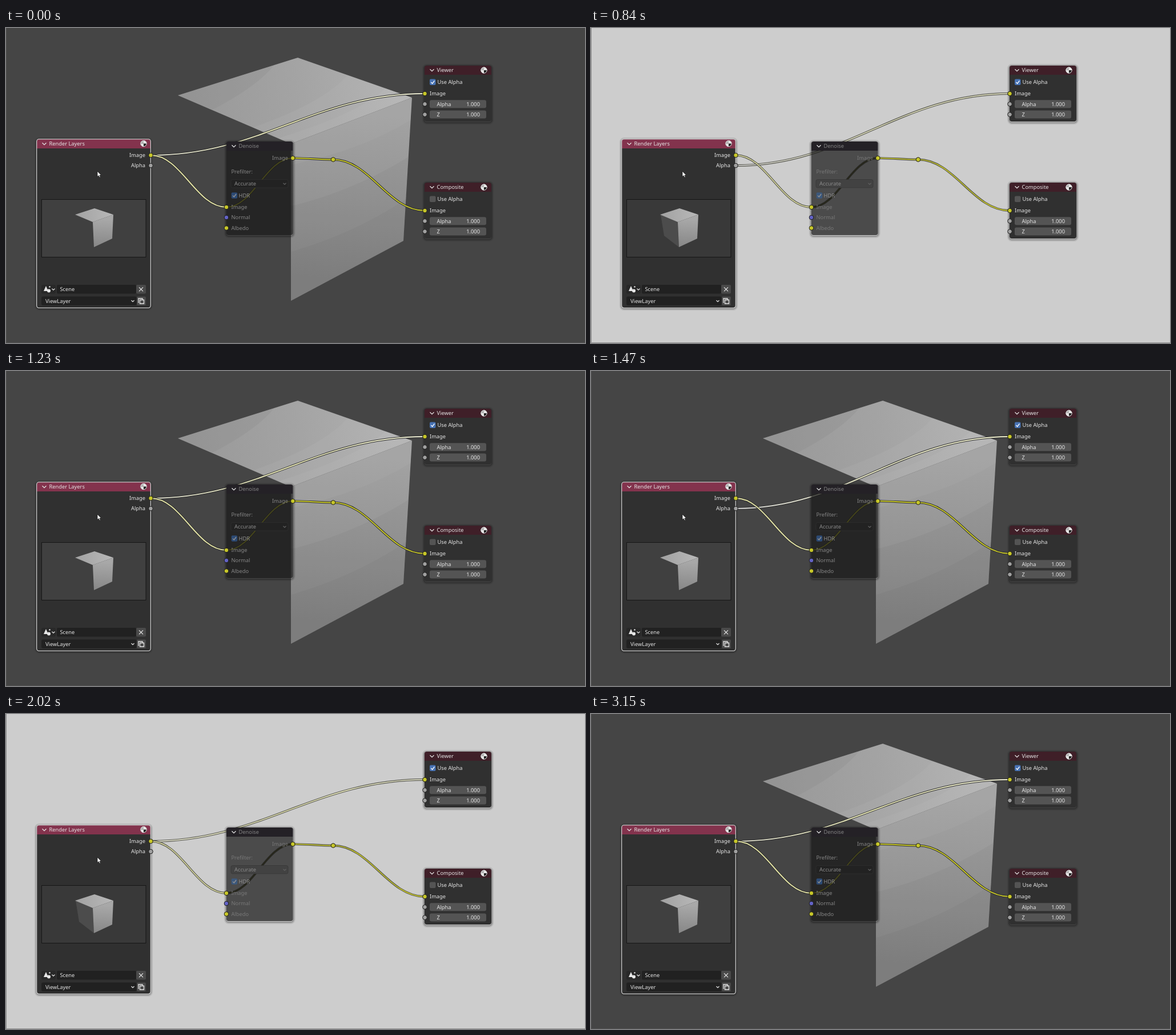
Recreate the animation shown at these times as an HTML page. Size 1014 by 552 pixels, loop 3.33 s.

```html
<!DOCTYPE html>
<html lang="en">
<head>
<meta charset="utf-8">
<title>Compositor nodes</title>
<style>
html, body { margin: 0; height: 100%; overflow: hidden; background: #454545; }
svg {
  display: block; width: 1014px; height: 552px;
  font: 9.3px "Noto Sans", "Open Sans", sans-serif;
  --bg: #454545; --edge: #525252; --rim: #e4e4e4; --muted: #868686; --field: #222;
  --check: #2c4a74; --inner: #b5b522; --thumb: #404040; --core: 2; --line: #2a2a2a;
}
svg.light {
  --bg: #cdcdcd; --edge: #8c8c8c; --rim: #d8d8d8; --muted: #787878; --field: #424242;
  --check: #3c587c; --inner: #4a4a18; --thumb: #393939; --core: 1.6; --line: #55554c;
}
.backdrop, .alpha .from-image, .from-alpha { display: none; }
svg:not(.light) .backdrop, .alpha .from-alpha { display: inline; }
.light .dark-only, svg:not(.light) .light-only { display: none; }
</style>
</head>
<body>
<script>
const WHITE = '#e6e6e6', YELLOW = '#c7c729', GREY = '#a1a1a1', PURPLE = '#6363c7';

const rect = (x, y, w, h, fill, r = 0, extra = '') =>
  `<rect x="${x}" y="${y}" width="${w}" height="${h}" rx="${r}" style="fill:${fill}" ${extra}/>`;
const poly = (points, fill, extra = '') => `<polygon points="${points}" fill="${fill}" ${extra}/>`;
const stroke = (d, color, width, extra = '') =>
  `<path d="${d}" fill="none" style="stroke:${color};stroke-width:${width}" ${extra}/>`;
const text = (x, y, label, fill = WHITE, anchor = 'start') =>
  `<text x="${x}" y="${y + 3.4}" style="fill:${fill}" text-anchor="${anchor}">${label}</text>`;
const chevron = (x, y, s = 3.5, color = WHITE) =>
  stroke(`M${x - s} ${y - s / 2}l${s} ${s}l${s} ${-s}`, color, 1.2);
const socket = (x, y, color) =>
  `<circle cx="${x}" cy="${y}" r="3.8" fill="${color}" stroke="#1c1c1c"/>`;
const gradient = (id, x1, y1, x2, y2, ...colors) =>
  `<linearGradient id="${id}" gradientUnits="userSpaceOnUse" x1="${x1}" y1="${y1}" x2="${x2}" y2="${y2}">` +
  colors.map((c, i) => `<stop offset="${i / (colors.length - 1)}" stop-color="${c}"/>`).join('') +
  '</linearGradient>';

// Noodle between two sockets with horizontal handles
function link(x1, y1, x2, y2, color) {
  const d = (x2 - x1) * 0.4;
  const path = `M${x1} ${y1}C${x1 + d} ${y1} ${x2 - d} ${y2} ${x2} ${y2}`;
  return stroke(path, 'var(--line)', 3.8) + stroke(path, color, 'var(--core)');
}

function checkbox(x, y, fill, tick) {
  return rect(x, y, 10.5, 10.5, fill, 2) +
    (tick ? stroke(`M${x + 2.4} ${y + 5.4}l2.2 2.4l3.8 -5`, tick, 1.4) : '');
}

const sphere = (x, y) =>
  `<circle cx="${x}" cy="${y}" r="5.2" fill="#222" stroke="${WHITE}"/>` +
  `<path d="M${x} ${y}v-5.2a5.2 5.2 0 0 1 5.2 5.2zM${x} ${y}v5.2a5.2 5.2 0 0 1 -5.2 -5.2z" fill="${WHITE}"/>` +
  `<path d="M${x} ${y}v-5.2a5.2 5.2 0 0 0 -5.2 5.2z" fill="${WHITE}" opacity=".75"/>`;

function node(x, y, w, h, title, header, body, bodyOpacity = 1, color = WHITE) {
  const halo = (out, opacity) => rect(x - out, y - out + 1, w + 2 * out, h + 2 * out, 'none', 4 + out,
    `stroke="#000" stroke-width="${2 * out}" opacity="${opacity}"`);
  const hh = 16, b = y + h, r = x + w;
  return halo(1, 0.22) + halo(2, 0.1) +
    `<path d="M${x} ${y + hh}H${r}V${b - 4}q0 4 -4 4H${x + 4}q-4 0 -4 -4z" fill="${body}" opacity="${bodyOpacity}"/>` +
    `<path d="M${x} ${y + hh}V${y + 4}q0 -4 4 -4H${r - 4}q4 0 4 4V${y + hh}z" fill="${header}"/>` +
    chevron(x + 13, y + 8) + text(x + 21.5, y + 8, title, color);
}

function outputNode(y, title, useAlpha) {
  const field = (dy, label) => rect(742, y + dy - 7, 99, 14, '#545454', 3) +
    text(754.5, y + dy, label) + text(830, y + dy, '1.000', WHITE, 'end') + socket(733.5, y + dy, GREY);
  return node(733, y, 117, 98, title, '#3f1f28', '#303030') + sphere(837, y + 8) +
    checkbox(742, y + 23.5, useAlpha ? '#4772b3' : '#545454', useAlpha && '#fff') +
    text(755.5, y + 28.5, 'Use Alpha') +
    text(742, y + 49, 'Image') + socket(733.5, y + 49, YELLOW) +
    field(67.3, 'Alpha') + field(85.6, 'Z');
}

function renderLayers() {
  return node(54, 195, 199, 295, 'Render Layers', '#83334d', '#303030') + sphere(241, 202.5) +
    rect(53.7, 194.7, 199.6, 295.8, 'none', 4, 'stroke="var(--rim)" stroke-width="1.1"') +
    text(244, 223, 'Image', WHITE, 'end') + text(244, 241, 'Alpha', WHITE, 'end') +
    rect(62.5, 300.5, 182.5, 101, 'var(--thumb)', 0, 'stroke="#161616"') +
    poly('122,327 152,339 154,384 128,364', '#4c4c4c', 'class="light-only"') +
    poly('121,327 155,316 188,327 152,340', 'url(#thumbTop)') +
    poly('152,340 188,327 186,369 154,384', 'url(#thumbSide)') +
    rect(62, 450, 25, 15.5, '#282828', 3) + rect(89, 450, 139, 15.5, '#212121', 2) +
    rect(228, 450, 17, 15.5, '#4a4a4a', 2) +
    `<path d="M70 452l4 9h-8z" fill="${WHITE}"/><circle cx="75" cy="460.5" r="3" fill="${WHITE}"/>` +
    `<circle cx="76.5" cy="453.5" r="1.2" fill="${WHITE}"/>` +
    chevron(83, 458, 2.5) + text(94.5, 457.7, 'Scene') +
    stroke('M233 454.3l7 7m0 -7l-7 7', WHITE, 1.2) +
    rect(62, 470.5, 167, 15.5, '#212121', 3) + rect(229, 470.5, 16, 15.5, '#4a4a4a', 2) +
    text(69, 478.3, 'ViewLayer') + chevron(222, 478.5, 2.5) +
    stroke('M232 482v-8h7v2M234.5 476.500h7v6.500h-7zM232 474h7', WHITE, 1.3) +
    socket(253.5, 223, YELLOW) + socket(253.5, 241, GREY);
}

function denoise() {
  const dim = 'var(--muted)';
  const input = (y, label, color) => text(394.5, y, label, dim) + socket(386, y, color);
  return node(386, 199, 116.5, 164, 'Denoise', '#242126', '#1a1a1a', 0.72, '#858585') +
    text(494, 228, 'Image', dim, 'end') + socket(502.3, 228, YELLOW) +
    text(394.5, 252, 'Prefilter:', dim) +
    rect(394, 265.5, 100, 14.5, 'var(--field)', 3, 'stroke="#333" stroke-width=".6"') +
    text(400, 272.7, 'Accurate', '#8c8c8c') + chevron(488, 273, 2.5, '#606060') +
    checkbox(394.7, 288.2, 'var(--check)', '#929292') + text(407.5, 293.5, 'HDR', '#929292') +
    input(314, 'Image', YELLOW) + input(332, 'Normal', PURPLE) + input(350.5, 'Albedo', YELLOW);
}

function backdrop() {
  const top = '301,118 511,52 711,122 499,203', side = '499,203 711,122 696,373 499,478';
  const band = (d, color, opacity) => `<path d="${d}" fill="${color}" opacity="${opacity}"/>`;
  return `<g class="backdrop">${poly(top, 'url(#top)')}${poly(side, 'url(#side)')}
    <clipPath id="topClip">${poly(top, '#000')}</clipPath><clipPath id="sideClip">${poly(side, '#000')}</clipPath>
    <g clip-path="url(#topClip)">
      ${band('M300 50H480Q455 95 362 143L300 120z', '#000', 0.035)}
      ${band('M430 175Q560 130 600 80L720 120L500 210z', '#fff', 0.04)}
      ${band('M470 195Q620 150 665 105L720 120L500 210z', '#fff', 0.04)}
    </g>
    <g clip-path="url(#sideClip)">
      ${band('M499 240Q620 215 711 160V90H499z', '#fff', 0.035)}
      ${band('M499 312Q610 285 706 225V500H499z', '#000', 0.03)}
      ${band('M499 392Q610 360 700 300V500H499z', '#000', 0.03)}
    </g></g>`;
}

document.body.innerHTML = `<svg viewBox="0 0 1014 552"><defs>
  ${gradient('top', 330, 150, 680, 110, '#999', '#a3a3a3', '#b0b0b0')}
  ${gradient('side', 600, 150, 585, 440, '#a2a2a2', '#959595', '#858585')}
  ${gradient('thumbTop', 121, 330, 188, 325, '#a2a2a2', '#b8b8b8')}
  ${gradient('thumbSide', 170, 335, 168, 380, '#a8a8a8', '#8a8a8a')}
  ${gradient('imageLink', 254, 0, 733, 0, '#deded0', '#e2e2b0', '#f0f0d8')}
  ${gradient('alphaLink', 254, 0, 733, 0, '#d2d2d2', '#e2e2c0', '#f0f0d0')}
  </defs>
  ${rect(0, 0, 1014, 552, 'var(--bg)')}
  ${backdrop()}
  ${stroke('M.5 0V551.5H1014', 'var(--edge)', 1)}
  <g class="from-image">${link(254, 223, 733, 115, 'url(#imageLink)')}</g>
  <g class="from-alpha">${link(254, 241, 733, 115, 'url(#alphaLink)')}</g>
  ${link(254, 223, 386, 314, '#e0e0a4')}
  ${link(386, 314, 502, 228, 'var(--inner)')}
  ${link(502, 228, 573, 230.5, YELLOW)}
  ${link(573, 230.5, 733, 320, YELLOW)}
  ${socket(573, 230.5, YELLOW)}
  ${renderLayers()}${denoise()}
  ${outputNode(66, 'Viewer', true)}${outputNode(271, 'Composite', false)}
  <path id="cursor" d="M0 0V9.500L2.200 7.600L3.800 11L5.400 10.300L3.900 7H6.800z" fill="#fff" stroke="#111" stroke-width=".7"/>
</svg>`;

const svg = document.querySelector('svg'), cursor = document.getElementById('cursor');
const LOOP = 3330, START = 2350, GLIDE = 2905;
const between = (t, a, b) => t >= a && t < b;
const bezier = (u, a, b, c, d) =>
  (1 - u) ** 3 * a + 3 * u * (1 - u) ** 2 * b + 3 * u * u * (1 - u) * c + u ** 3 * d;

// The pointer swings below the muted node, then glides right and vanishes
function pointer(t) {
  if (t < START) return [160, 251];
  if (t < GLIDE) {
    const u = (1 + Math.floor((t - START) / 55.5)) / 10;
    return [bezier(u, 160, 240, 400, 501), bezier(u, 251, 435, 450, 321)];
  }
  const u = (1 + Math.floor((t - GLIDE) / 60)) / 4;
  return [501 + 67 * u, 321 - 5 * u];
}

function draw(now) {
  const t = now % LOOP;
  svg.classList.toggle('light', between(t, 840, 1230) || between(t, 1650, 2170));
  svg.classList.toggle('alpha', between(t, 680, 1080) || between(t, 1470, 2020));
  cursor.setAttribute('transform', `translate(${pointer(t)})`);
  cursor.style.display = t < 3150 ? '' : 'none';
  requestAnimationFrame(draw);
}
draw(0);
</script>
</body>
</html>
```
